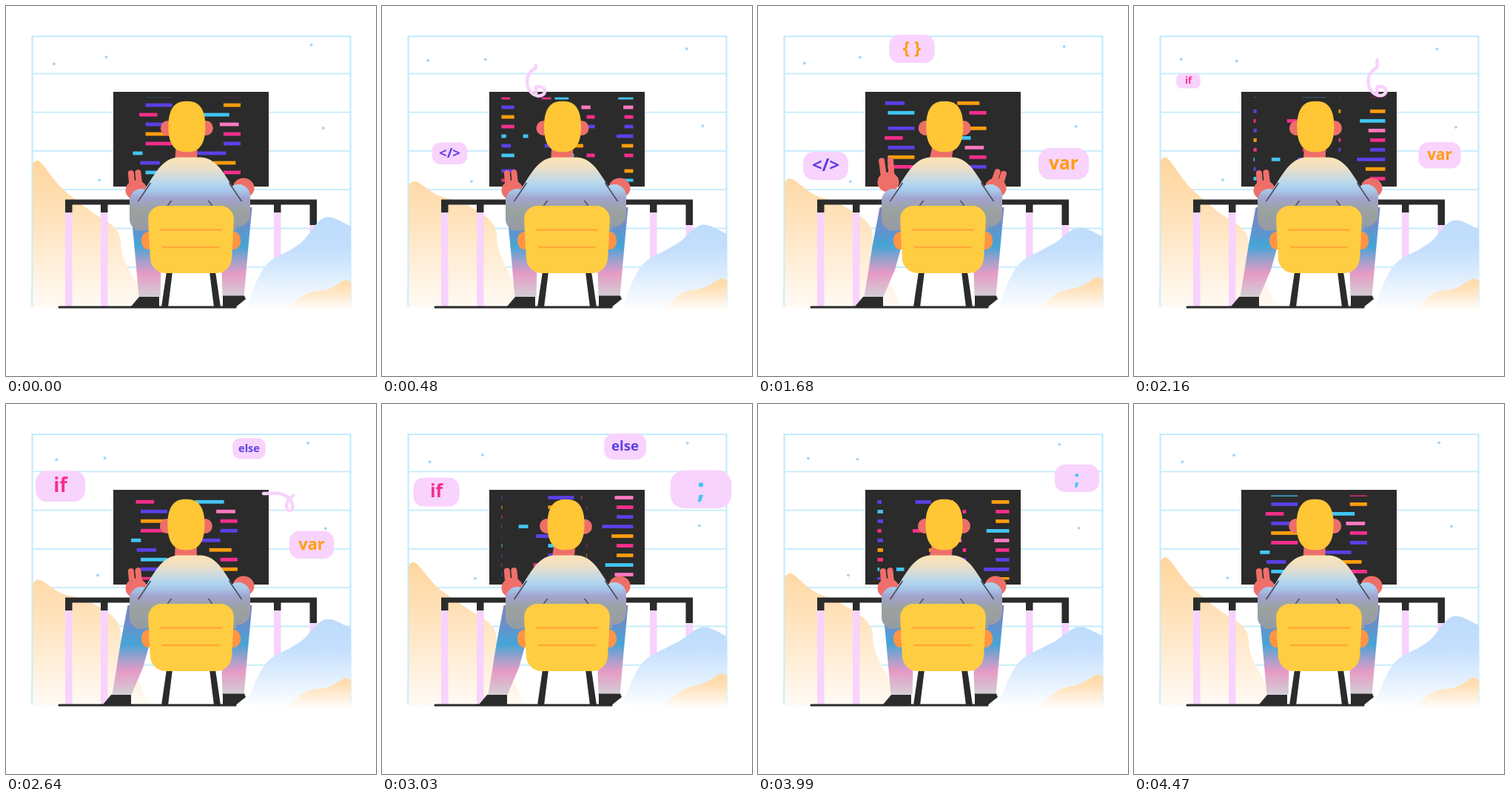
Animation, 500 px wide and 500 px high, one loop 4500 ms. Source, as an HTML page with a canvas:

```html
<!DOCTYPE html>
<html lang="en">
<head>
<meta charset="utf-8">
<title>Coder at a desk</title>
<style>
html, body { margin: 0; width: 100%; height: 100%; overflow: hidden; background: #fff; }
canvas { display: block; width: 500px; height: 500px; }
</style>
</head>
<body>
<canvas id="stage" width="500" height="500"></canvas>
<script>
const ctx = document.getElementById('stage').getContext('2d');
const LOOP = 4500, TAU = Math.PI * 2, SIDES = [-1, 1];
const DARK = '#2b2b2b', SKIN = '#ee6f69', HAIR = '#ffc636', BUBBLE = '#f8d3fd', GRID = '#c3ebfc';
const PURPLE = '#5b40e6', PINK = '#f62e8c', CYAN = '#42c6f3', ORANGE = '#ff9d0c', ROSE = '#ff78c0';

const clamp = (v, a = 0, b = 1) => Math.min(b, Math.max(a, v));
const lerp = (a, b, k) => a + (b - a) * k;
const ease = k => { k = clamp(k); return k * k * (3 - 2 * k); };
// Rises to 1 after `from`, falls back to 0 before `to`
const pulse = (t, from, to, ramp = 300) => ease((t - from) / ramp) - ease((t - to + ramp) / ramp);

function gradient(y0, y1, ...stops) {
  const g = ctx.createLinearGradient(0, y0, 0, y1);
  stops.forEach(([at, color]) => g.addColorStop(at, color));
  return g;
}
function rect(x, y, w, h, color) {
  ctx.fillStyle = color;
  ctx.fillRect(x, y, w, h);
}
function roundRect(x, y, w, h, r, color) {
  ctx.fillStyle = color;
  ctx.beginPath();
  ctx.roundRect(x, y, w, h, r);
  ctx.fill();
}
function ellipse(x, y, rx, ry, color) {
  ctx.fillStyle = color;
  ctx.beginPath();
  ctx.ellipse(x, y, rx, ry, 0, 0, TAU);
  ctx.fill();
}
function polygon(points, color) {
  ctx.fillStyle = color;
  ctx.beginPath();
  points.forEach(p => ctx.lineTo(p[0], p[1]));
  ctx.closePath();
  ctx.fill();
}
// Points given as [distance from the axis, y]
const mirrored = (side, axis, points) => points.map(([d, y]) => [axis + side * d, y]);

function line(x1, y1, x2, y2, color, width, cap = 'butt') {
  ctx.strokeStyle = color;
  ctx.lineWidth = width;
  ctx.lineCap = cap;
  ctx.beginPath();
  ctx.moveTo(x1, y1);
  ctx.lineTo(x2, y2);
  ctx.stroke();
}

// Background ---------------------------------------------------------------
// x, y, start angle in degrees
const DOTS = [[65, 75, 90], [136.5, 72, -110], [410.5, 55, -50], [432, 165, -180], [123, 234.5, 14]];

function drawBackdrop(t) {
  for (let i = 0; i < 7; i++) line(35, 39 + 52.3 * i + (i ? 0 : 2), 466, 39 + 52.3 * i + (i ? 0 : 2), GRID, 1.8);
  for (const x of [35.5, 465.5]) line(x, 40, x, 406, GRID, 2.3);
  for (const [x, y, deg] of DOTS) {
    const a = TAU * (deg / 360 + t / 1500);
    ellipse(x + 3.2 * Math.cos(a), y + 3.2 * Math.sin(a), 1.9, 1.9, '#a6d3f5');
  }
}

// Outline through key points; sink(x) is how far the crest drops in the trough of the swell
const HILLS = {
  left: {
    peak: 985, base: 407,
    keys: [[36, 208], [46, 206], [75, 244], [112, 277], [150, 305], [160, 345], [195, 405]],
    sink: x => 34 * Math.cos((x - 41) / 32) * Math.exp((41 - x) / 100),
    fill: gradient(206, 407, [0, '#ffd59c'], [0.4, '#ffe2bb'], [1, '#fffaf4'])
  },
  blue: {
    peak: 140, base: 412,
    keys: [[323, 410], [350, 352], [387, 328], [403, 315], [424, 287], [440, 283], [466, 295]],
    sink: x => 20 * ease((x - 390) / 40),
    fill: gradient(285, 411, [0, '#bddbfb'], [0.35, '#c3dffd'], [1, '#ffffff'])
  },
  small: {
    peak: 190, base: 412,
    keys: [[378, 411], [405, 390], [435, 385], [457, 373], [466, 375]],
    sink: x => -8 * ease((x - 380) / 60),
    fill: gradient(365, 412, [0, '#ffd8a2'], [0.3, '#ffdfb4'], [1, '#ffffff'])
  }
};

function drawHill({ peak, base, keys, sink, fill }, t) {
  const k = (1 - Math.cos(TAU * (t - peak) / 1125)) / 2;
  const points = keys.map(([x, y]) => [x, y + k * sink(x)]);
  const at = i => points[clamp(i, 0, points.length - 1)];
  ctx.beginPath();
  ctx.moveTo(...points[0]);
  for (let i = 0; i < points.length - 1; i++) {
    const [a, b, c, d] = [at(i - 1), at(i), at(i + 1), at(i + 2)];
    ctx.bezierCurveTo(b[0] + (c[0] - a[0]) / 6, b[1] + (c[1] - a[1]) / 6,
      c[0] - (d[0] - b[0]) / 6, c[1] - (d[1] - b[1]) / 6, c[0], c[1]);
  }
  ctx.lineTo(at(99)[0], base);
  ctx.lineTo(points[0][0], base);
  ctx.fillStyle = fill;
  ctx.fill();
}

// Screen -------------------------------------------------------------------
// left colour, left track length, right colour, right track length
const CODE = [
  [PURPLE, 98, ORANGE, 63], [PINK, 67, CYAN, 106], [PURPLE, 98, ROSE, 70], [ORANGE, 98, PINK, 63],
  [PINK, 98, PURPLE, 63], [CYAN, 36, PURPLE, 118], [PURPLE, 72, ORANGE, 82], [CYAN, 98, PINK, 63]];

// A dash that runs along its track and wraps round at the end
function dash(x, y, length, u, color) {
  const end = u + 0.367;
  rect(x + u * length, y - 2.4, (Math.min(end, 1) - u) * length, 4.8, color);
  if (end > 1) rect(x, y - 2.4, (end - 1) * length, 4.8, color);
}

function drawScreen(t) {
  rect(145, 116, 210, 128, DARK);
  const u = (0.275 + t / 900) % 1;
  ctx.save();
  ctx.beginPath();
  ctx.rect(155, 123.5, 190, 114);
  ctx.clip();
  for (const start of [30, 134, 246, 350]) {
    CODE.forEach(([left, leftLength, right, rightLength], row) => {
      const y = start + row * 13 - 216 * t / LOOP;
      dash(161.5, y, leftLength, u, left);
      dash(339.5 - rightLength, y, rightLength, u, right);
    });
  }
  ctx.restore();
}

function drawDesk() {
  for (const x of [80, 128, 362, 410.5]) {
    const joint = x > 400 ? 296 : 279;
    rect(x, joint, 9.5, 406 - joint, BUBBLE);
    rect(x, 262, 9.5, joint - 262, DARK);
  }
  rect(80, 261.5, 340, 7, DARK);
}

// Word bubbles -------------------------------------------------------------
const LIFE = 1420;
const TAGS = [
  { text: '</>', color: PURPLE, size: 24, x: 91.5, y: 198, drift: 20, pop: 400 },
  { text: '{ }', color: ORANGE, size: 23, x: 208, y: 64, drift: -8, pop: 600 },
  { text: 'var', color: ORANGE, size: 22, x: 413, y: 220, drift: -34, pop: 1400 },
  { text: 'if', color: PINK, size: 24, x: 73.5, y: 100, drift: 29, pop: 2100 },
  { text: 'else', color: PURPLE, size: 20, x: 328.5, y: 63, drift: -10, pop: 2250 },
  { text: ';', color: CYAN, size: 28, x: 431, y: 119, drift: -22, pop: 2790 }];

// A ribbon that leaves the screen, makes one loop and ends at the bubble
function drawTrail({ x, y }, age) {
  const head = ease((age + 340) / 340), tail = ease((age + 130) / 240);
  if (age < -340 || tail >= 1) return;
  const startX = clamp(x, 150, 348), startY = clamp(y, 121, 239), side = Math.sign(x - startX) || 1;
  ctx.beginPath();
  for (let i = 0; i <= 40; i++) {
    const u = lerp(tail, head, i / 40), a = TAU * clamp((u - 0.2) / 0.45);
    ctx.lineTo(lerp(startX, x, u) + side * 12 * Math.sin(a), lerp(startY, y, u) + 12 * (1 - Math.cos(a)));
  }
  ctx.strokeStyle = BUBBLE;
  ctx.lineWidth = 4.5;
  ctx.lineCap = ctx.lineJoin = 'round';
  ctx.stroke();
}

function drawTag(tag, t) {
  const age = t - tag.pop;
  drawTrail(tag, age);
  if (age <= 0 || age >= LIFE) return;
  const spring = 1 - Math.exp(-age / 300) * Math.cos(TAU * age / 400);
  const scale = spring * clamp((LIFE - age) / 120);
  ctx.save();
  ctx.translate(tag.x, tag.y + tag.drift * age / LIFE);
  ctx.scale(scale, scale);
  roundRect(-30.5, -19, 61, 38, 14, BUBBLE);
  ctx.fillStyle = tag.color;
  ctx.font = `700 ${tag.size}px "Open Sans", sans-serif`;
  ctx.textAlign = 'center';
  ctx.fillText(tag.text, 0, tag.size * 0.3);
  ctx.restore();
}

// Person -------------------------------------------------------------------
function drawHead(t, turn) {
  const amount = Math.abs(turn), side = Math.sign(turn);
  const sway = -5.5 * Math.cos(TAU * (t - 260) / 2250);
  const cx = 248.5 + lerp(sway, 0, amount) + 22.5 * turn, cy = 163 + 4 * amount;
  const neck = 245 + sway * 0.4;
  polygon([[cx - 14, cy + 15], [cx + 14, cy + 15], [neck + 15, 208], [neck - 15, 208]], SKIN);

  ctx.save();
  ctx.translate(cx, cy);
  ctx.rotate(0.2 * turn);
  ellipse(side * 9 * amount, 18, 18, 16, SKIN);
  for (const ear of SIDES) {
    const facing = ear === side ? amount : 0;
    ellipse(ear * (26 - 3 * amount), 2 + 15 * facing, 9.5, 10, SKIN);
  }
  // Rounded cap of hair, cut away over the cheek that turns into view
  const hair = [];
  for (let i = 0; i < 72; i++) {
    const c = Math.cos(TAU * i / 72), s = Math.sin(TAU * i / 72);
    const x = Math.sign(c) * Math.abs(c) ** 0.75 * 25;
    const y = Math.sign(s) * Math.abs(s) ** 0.85 * (34.3 - 4 * amount);
    hair.push([x, y - 24 * amount * clamp(side * x / 25) * clamp(y / 30)]);
  }
  polygon(hair, HAIR);
  ctx.restore();
}

// Palm with two fingers fanned round the lean angle
function drawHand(x, y, lean, first, second) {
  ellipse(x, y, 14.5, 13.5, SKIN);
  [first, second].forEach((length, i) => {
    const a = lean + (i ? 0.2 : -0.2);
    line(x + (i ? 5 : -5), y, x + length * Math.cos(a), y + length * Math.sin(a), SKIN, 8, 'round');
  });
}

function drawHands(lookLeft, lookRight, wave) {
  const reach = 24 * (1 - lookLeft) + 6 * (wave + lookRight);
  drawHand(176, 249 - 11 * wave - 16 * lookRight, -1.67, reach, reach * (1 - 0.75 * lookRight));
  const open = 22 * (wave + lookRight);
  drawHand(321, 246 - 14 * lookLeft - 4 * lookRight, -1.25 + 0.4 * lookLeft, open + 20 * lookLeft, open);
}

function drawLegs(t) {
  const fill = gradient(268, 393, [0, '#8581bd'], [0.2, '#6f8cc9'], [0.45, '#45a4d6'], [0.62, '#a79fcb'], [0.75, '#e69bc5'], [1, '#d2cfd5']);
  const step = pulse(t, 550, 3850, 350), tap = pulse(t, 650, 1200, 230);
  for (const side of SIDES) {
    const s = side < 0 ? step : 0;
    polygon(mirrored(side, 250.5, [[82 + 4 * s, 272], [77 + 19 * s, 325], [71 + 36 * s, 393],
      [42 + 39 * s, 393], [41 + 24 * s, 355], [35 + 15 * s, 300], [45, 272]]), fill);
  }
  ctx.save();
  ctx.translate(207 - 38 * step, 407);
  ctx.rotate(0.22 * tap);
  polygon([[-27, -14], [0, -14], [0, 0], [-38, -1]], DARK);
  ctx.restore();
  polygon([[293, 391.5], [322, 391.5], [324, 396], [309, 408], [293, 408]], DARK);
}

function drawBody() {
  const cloth = gradient(204, 304, [0, '#fee4b3'], [0.15, '#ecdfc6'], [0.36, '#b5d7f0'], [0.46, '#a5c6ea'], [0.56, '#a2a3cf'], [0.72, '#9ba29f'], [1, '#969aa5']);
  ctx.fillStyle = cloth;
  ctx.beginPath();
  ctx.moveTo(232, 204.5);
  ctx.lineTo(264, 204.5);
  ctx.bezierCurveTo(285, 206, 295, 226, 314, 258);
  ctx.lineTo(311, 303);
  ctx.lineTo(185, 303);
  ctx.lineTo(182, 258);
  ctx.bezierCurveTo(201, 226, 211, 206, 232, 204.5);
  ctx.fill();
  for (const side of SIDES) {
    const at = d => 248.5 + side * d;
    roundRect(at(65.5) - 16, side < 0 ? 247 : 241, 32, 57, 16, cloth);
    line(at(70), 264, at(53), 239, '#4b4d57', 1.6);
    line(at(25), 263, at(33), 274, '#4b4d57', 1.4);
  }
}

function drawChair(lift) {
  for (const side of SIDES) {
    polygon(mirrored(side, 250, [[33, 359], [25, 359], [31, 407], [40, 407]]), DARK);
    ellipse(250 + side * 58, 317, 9.2, 12, '#ff9545');
  }
  const top = 270 - lift;
  ctx.fillStyle = '#ffcd42';
  ctx.beginPath();
  ctx.moveTo(250, top);
  ctx.arcTo(309, top, 304, 361, 18);
  ctx.arcTo(304, 361, 250, 361, 21);
  ctx.arcTo(196, 361, 191, top, 21);
  ctx.arcTo(191, top, 250, top, 18);
  ctx.fill();
  line(208, 302.5 - lift * 0.6, 292, 302.5 - lift * 0.6, '#ffa936', 2.4);
  line(211, 326 - lift * 0.4, 288.5, 326 - lift * 0.4, '#ffa936', 2.4);
}

function drawPerson(t) {
  const lookLeft = pulse(t, 600, 1450), lookRight = pulse(t, 3000, 3850), wave = pulse(t, 1380, 2150);
  line(72, 407, 310, 407, DARK, 3.2, 'round');
  drawLegs(t);
  drawHead(t, lookRight - lookLeft);
  drawHands(lookLeft, lookRight, wave);
  ctx.save();
  ctx.translate(2 * lookRight, -2 * lookLeft);
  drawBody();
  ctx.restore();
  drawChair(2 * (lookLeft + lookRight));
}

function draw(t) {
  rect(0, 0, 500, 500, '#fff');
  drawBackdrop(t);
  drawHill(HILLS.left, t);
  drawScreen(t);
  drawDesk();
  drawHill(HILLS.blue, t);
  drawHill(HILLS.small, t);
  TAGS.forEach(tag => drawTag(tag, t));
  drawPerson(t);
}

const start = performance.now();
function tick() {
  draw((performance.now() - start) % LOOP);
  requestAnimationFrame(tick);
}
tick();
</script>
</body>
</html>
```
